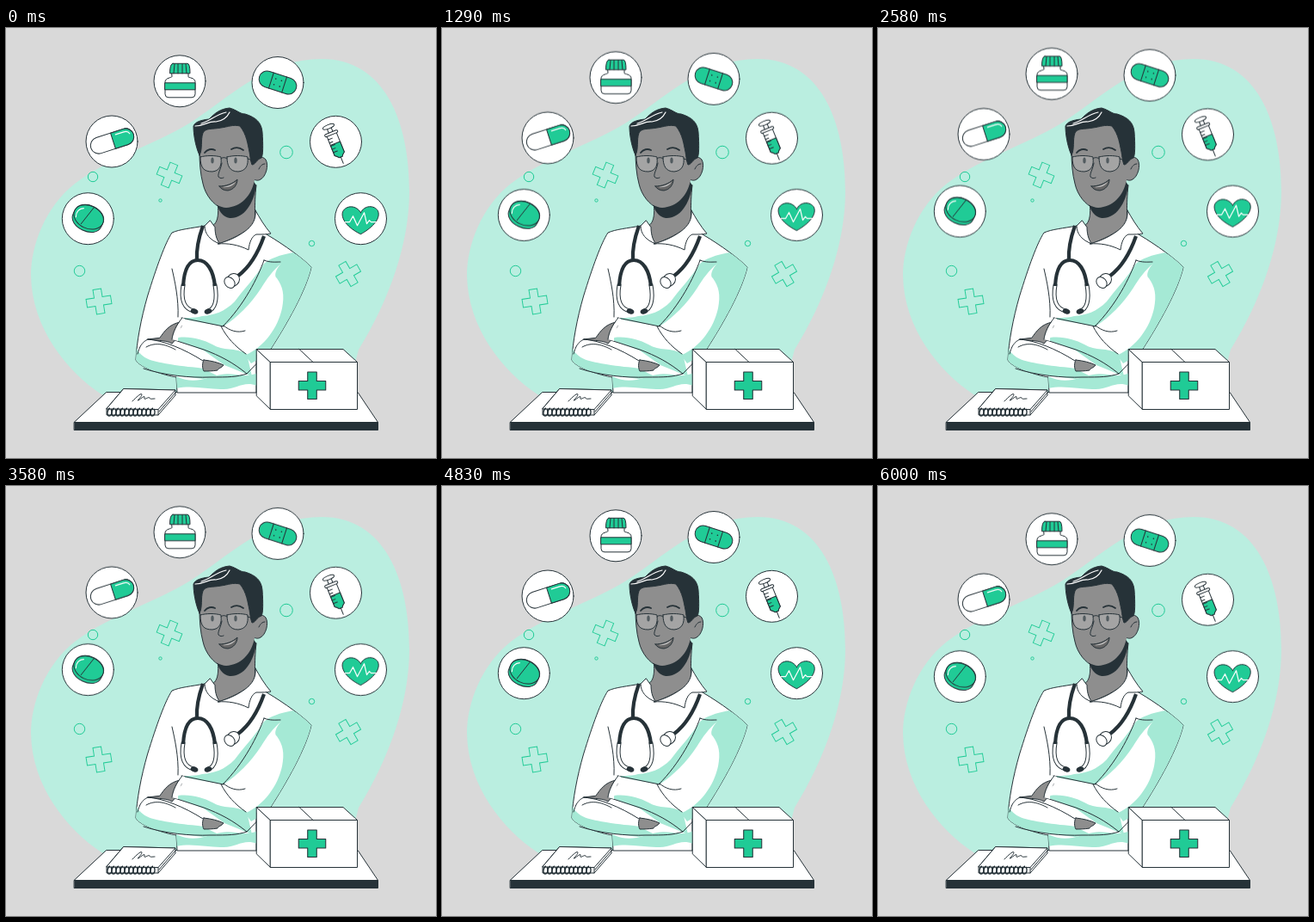
An HTML page without scripts for the animation above (6040 ms loop, 500x500 px).

```html
<!DOCTYPE html>
<html lang="en">
<head>
<meta charset="utf-8">
<title>Doctor with floating medical icons</title>
<style>
  html, body { margin: 0; width: 100%; height: 100%; overflow: hidden; background: #d9d9d9; }
  svg { display: block; width: 100%; height: 100%; }
  .ink { stroke: #263238; stroke-width: 1; stroke-linejoin: round; stroke-linecap: round; }
  .white { fill: #fff; }
  .green { fill: #20cb96; }
  .mint { fill: #a5e9d5; }
  .skin { fill: #8e8e8e; }
  .dark { fill: #263238; }
  .line { fill: none; }
  .shine { fill: none; stroke: #fff; stroke-width: 1.2; stroke-linecap: round; stroke-linejoin: round; }
  .deco { fill: none; stroke: #20cb96; stroke-width: 1; }
  .dots { stroke-width: 1.6; stroke-dasharray: 0 7; }
  .tube { fill: none; stroke: #263238; stroke-width: 4.2; }
  .float { animation: bob 3020ms linear infinite alternate; }
  @keyframes bob { to { transform: translateY(-10px); } }
</style>
</head>
<body>
<svg viewBox="0 0 500 500">
  <defs>
    <path id="plus" d="M-5-15H5V-5H15V5H5V15H-5V5H-15V-5H-5Z"/>
    <circle id="disc" class="white ink" r="30"/>
    <path id="coil" class="line" d="M0 0C-4 2-4 9-1 9S3 4 1 1" stroke="#263238" stroke-width="1.5"/>
    <path id="body" d="M231 230C215 233 202 234 193 238C185 250 175 278 164.500 312C157 338 152 365 151 386C155 395 185 404 198 406L199 424H291V380L308 373C326 345 349 305 355 278C345 268 325 253 303 240L288 228Z"/>
    <clipPath id="coat"><use href="#body"/></clipPath>
  </defs>

  <!-- Backdrop -->
  <path fill="#baeee0" d="M111 426C72 400 30 350 29 288C29 252 46 208 80 181C122 149 180 134 222 105C266 75 306 36 367 36C440 36 469 108 469 190C469 250 446 316 410 374L395 430H120Z"/>
  <g class="deco">
    <use href="#plus" transform="translate(190 171) rotate(22) scale(.94)"/>
    <use href="#plus" transform="translate(108 318) rotate(-9) scale(.96)"/>
    <use href="#plus" transform="translate(398 286) rotate(-30) scale(.94)"/>
    <circle cx="101" cy="173" r="5.7"/>
    <circle cx="179.500" cy="200.500" r="1.700"/>
    <circle cx="326" cy="144.500" r="7.300"/>
    <circle cx="85.500" cy="282.500" r="6.200"/>
    <circle cx="355.500" cy="250.500" r="3.200"/>
  </g>

  <!-- Table -->
  <path class="white ink" d="M117 423.500H409L432.500 458.500H79.500Z"/>
  <path class="dark ink" d="M79.500 458.500H432.500V467.500H79.500Z"/>

  <!-- Coat -->
  <use href="#body" class="white ink"/>
  <g clip-path="url(#coat)">
    <g class="mint">
      <path d="M334 261C318 264 307 268 300 274C290 290 277 303 266 318C254 330 242 334 228 335C218 338 207 336 203 338L253 347L285 390L310 376L362 278Z"/>
    </g>
    <path class="white" d="M320 274C311 281 303 292 297 302C284 322 269 336 253 347C258 360 268 368 279 380C300 371 316 349 321 326C324 310 322 301 315 291C311 288 314 280 320 274Z"/>
    <g class="mint">
      <path d="M193 361C211 357 227 361 240 368C253 376 266 371 280 379L286 405L254 392L230 375Z"/>
      <path d="M151 370C156 386 174 388 191 391C206 394 219 394 229 396L247 405L229 408L150 398Z"/>
      <path d="M198 405C220 416 235 405 250 403C264 400 279 408 292 401V416C276 410 269 420 253 420C237 421 218 415 198 419Z"/>
    </g>
  </g>
  <g class="line ink">
    <path d="M193 280C196 293 201 315 200 336"/>
    <path d="M300 270C293 290 277 322 252 347M300 270C307 273 314 272 319 272"/>
    <path d="M204 337L253 347M253 346C260 352 269 355 278 352"/>
    <path d="M193 362L230 374C249 381 264 389 280 402L308 373"/>
    <path d="M165 362C158 365 155 371 153 379M165 362C182 363 207 373 229 387"/>
    <path d="M163 371C175 364 188 369 197 374"/>
    <path d="M160 396C184 404 215 407 237 406C259 406 268 406 280 402"/>
    <path d="M250 347C257 360 266 370 279 379"/>
  </g>
  <path class="skin ink" d="M179 360C184 353 190 344 203 342L204 347C198 354 198 363 193 367C187 363 179 364 165 362Z"/>
  <path class="white" d="M205 337C200 344 194 354 193 362L200 364C200 356 203 348 208 338Z"/>
  <path class="line ink" d="M205 337C198 345 194 354 193 362"/>
  <path class="skin ink" d="M230 386C239 387 247 389 253 392C251 395 246 396 246 398C240 399 235 399 230 399C228 395 228 390 230 386Z"/>

  <!-- Neck and collar -->
  <path class="skin ink" d="M246 200C248 219 246 229 237 231L247 251C260 247 278 238 288 229C291 222 288 207 291 183Z"/>
  <path class="white ink" d="M237 224L231 230C231 239 237 247 249 251C244 246 243 237 243 232Z"/>
  <path class="white ink" d="M290 212C291 222 287 230 277 237C267 244 257 248 246 251C258 250 270 252 282 258C283 249 286 242 291 240C298 240 304 240 308 239C301 231 295 221 290 212Z"/>

  <!-- Stethoscope -->
  <path class="tube" d="M229 230C224 244 221 256 222 270"/>
  <path class="tube" d="M300 242C294 259 286 276 270 288"/>
  <g class="line" stroke-linecap="round">
    <path d="M206 299C203 316 207 327 219 329M243 299C246 316 243 327 235 329" stroke="#263238" stroke-width="5"/>
    <path d="M206 299C203 316 207 327 219 329M243 299C246 316 243 327 235 329" stroke="#fff" stroke-width="3"/>
  </g>
  <path class="tube" d="M206 300C207 282 212 270 223 270S241 282 243 300"/>
  <ellipse class="dark" cx="219" cy="329.500" rx="4.500" ry="3" transform="rotate(20 219 329.500)"/>
  <ellipse class="dark" cx="235" cy="329.500" rx="4.500" ry="3" transform="rotate(-20 235 329.500)"/>
  <ellipse class="white ink" cx="264" cy="293" rx="8" ry="7" transform="rotate(-45 264 293)"/>
  <ellipse class="white ink" cx="260" cy="296" rx="7" ry="5.500" transform="rotate(50 260 296)"/>

  <!-- Head -->
  <path class="dark" d="M244 202C247 212 252 220 260 221C276 222 288 205 291 183L284 172Z"/>
  <path class="skin ink" d="M287 158C291 150 298 148 302 153C306 160 302 173 296 176C293 178 290 177 288 176Z"/>
  <path class="skin" d="M225 144C225 156 226 170 229 181C232 195 242 208 256 209C273 208 285 196 289 177V153L278 108L226 116Z"/>
  <path class="line ink" d="M225 144C225 156 226 170 229 181C232 195 242 206 250 209"/>
  <path class="line ink" d="M294 164C296 160 298 158 301 158"/>
  <path class="dark ink" d="M225 148C220 137 218 123 218 114C220 109 227 107 236 106C243 99 249 94 260 93C268 95 272 100 278 100C291 104 297 110 298 121C299 136 299 148 297 151C291 153 290 159 286 159C284 154 284 149 283 144C281 135 280 124 272 114C264 112 258 115 250 116C240 118 232 116 229 122C226 131 229 140 225 148Z"/>
  <path class="shine" d="M220 114C231 114 235 108 244 109C253 108 257 104 260 98M227 111C238 108 243 101 256 98"/>
  <path class="line" stroke="#263238" stroke-width="1.800" stroke-linecap="round" d="M231 145C234 141 239 140 243 142M262 141C267 138 272 139 276 142"/>
  <ellipse class="dark" cx="240" cy="154" rx="1.700" ry="3.600"/>
  <ellipse class="dark" cx="267" cy="154" rx="1.700" ry="3.600"/>
  <g class="ink" fill="#fff" fill-opacity=".2">
    <path d="M226 150C233 148 243 148 250 150C251 159 249 166 240 167C230 167 226 163 226 150Z"/>
    <path d="M257 150C264 148 275 148 281 150C282 160 279 166 270 167C260 167 257 160 257 150Z"/>
  </g>
  <path class="line ink" d="M250 152Q253 149 257 152M281 152L290 155M251 157C250 164 246 169 247 173C249 175 251 175 253 174"/>
  <path class="ink" fill="#666" d="M248 184C256 184 264 181 269 176C269 182 265 188 258 189C253 189 250 187 248 184Z"/>
  <path fill="#c0c0c0" d="M252 185C258 184 263 182 267 179C265 183 258 186 252 185Z"/>

  <!-- First-aid box -->
  <g class="white ink">
    <path d="M291.500 373.500L307.500 388.500V443.500L291.500 428Z"/>
    <path d="M291.500 373.500H392L408.500 388.500H307.500Z"/>
    <path d="M307.500 388.500H408.500V443.500H307.500Z"/>
    <path d="M341 373.500L357 388.500"/>
  </g>
  <use href="#plus" class="green ink" transform="translate(356 415.800) scale(1.050)"/>

  <!-- Notepad -->
  <path class="white ink" d="M137 419.500L197 421V427L177 450H117V443Z"/>
  <path class="white ink" d="M137 419.500L197 421L177 443.500L117 443Z"/>
  <path class="line ink" d="M177 443.500V450M178 446L197 424M147 434C152 429 157 424 158 426C158 429 151 434 154 433C159 429 162 427 161 430C160 434 166 428 167 430C167 432 170 431 173 431"/>
  <g>
    <use href="#coil" x="121" y="442"/><use href="#coil" x="126" y="442"/>
    <use href="#coil" x="131" y="442"/><use href="#coil" x="136" y="442"/>
    <use href="#coil" x="141" y="442"/><use href="#coil" x="146" y="442"/>
    <use href="#coil" x="151" y="442"/><use href="#coil" x="156" y="442"/>
    <use href="#coil" x="161" y="442"/><use href="#coil" x="166" y="442"/>
    <use href="#coil" x="171" y="442"/>
  </g>

  <!-- Floating icons -->
  <g class="float">
    <g transform="translate(202 61.800)">
      <use href="#disc"/>
      <path class="white ink" d="M-9-10H10V-5C10-4 18-4 18 1V15Q18 19 14 19H-13Q-17 19-17 15V1C-17-4-9-4-9-5Z"/>
      <path class="green ink" d="M-17 2H18V10H-17Z"/>
      <path class="green ink" d="M-8-20.500H9Q12-20.500 12-9H-11.500Q-11.500-20.500-8-20.500Z"/>
      <path class="line ink" d="M-6-20L-7-9M-2-20V-9M3-20V-9M7-20L8-9"/>
    </g>

    <g transform="translate(316 63.500)">
      <use href="#disc"/>
      <g transform="rotate(18)">
        <rect class="green ink" x="-22.500" y="-9.500" width="45" height="19" rx="9.500"/>
        <path class="line ink" d="M-8-9.500V9.500M8-9.500V9.500"/>
        <path class="line ink dots" d="M-3.500-3.500H4M-3.500 3.500H4"/>
      </g>
    </g>

    <g transform="translate(123 132)">
      <use href="#disc"/>
      <g transform="translate(.5 -.5) rotate(-18)">
        <rect class="white ink" x="-26" y="-9.500" width="52" height="19" rx="9.500"/>
        <path class="green ink" d="M1-9.500H16.500A9.500 9.500 0 0 1 16.500 9.500H1Z"/>
        <path class="shine" d="M6-6H16Q21-6 22-2"/>
      </g>
    </g>

    <g transform="translate(383.500 132.300)">
      <use href="#disc"/>
      <g transform="translate(-1 1) rotate(-22)">
        <path class="line ink" d="M0 15V26"/>
        <path class="white ink" d="M-2.500-18H2.500V-9H-2.500Z"/>
        <ellipse class="white ink" cy="-20" rx="7" ry="2.300"/>
        <path class="white ink" d="M-6-11H6V14Q3 16 2 18H-2Q-3 16-6 14Z"/>
        <path class="green ink" d="M-6 1H6V14Q3 16 2 18H-2Q-3 16-6 14Z"/>
        <rect class="white ink" x="-8" y="-13" width="16" height="3" rx="1.500"/>
        <path class="line ink" d="M-6-6H-1M-6-2H-2M-6 2H-1M-6 6H-2M-6 10H-1"/>
      </g>
    </g>

    <g transform="translate(95.300 221.700)">
      <use href="#disc"/>
      <g transform="rotate(25)">
        <path class="green ink" d="M-18-2C-18-20 18-20 18-2V2C18 19-18 19-18 2Z"/>
        <ellipse class="green ink" cy="-2" rx="18" ry="13.200"/>
      </g>
      <path class="line ink" d="M-8 6L7-13"/>
      <path class="shine" d="M-14-2C-14-8-10-12-5-12"/>
    </g>

    <g transform="translate(412.500 221.700)">
      <use href="#disc"/>
      <path class="green ink" d="M0-7C4-16 16-16 20-9C24 1 11 12 0 18C-11 13-24 2-21-8C-17-16-5-16 0-7Z"/>
      <path class="shine" d="M-18 4H-13L-9-3L-4 8L4-7L7 6L10 2L12 4H18"/>
    </g>
  </g>
</svg>
</body>
</html>
```
